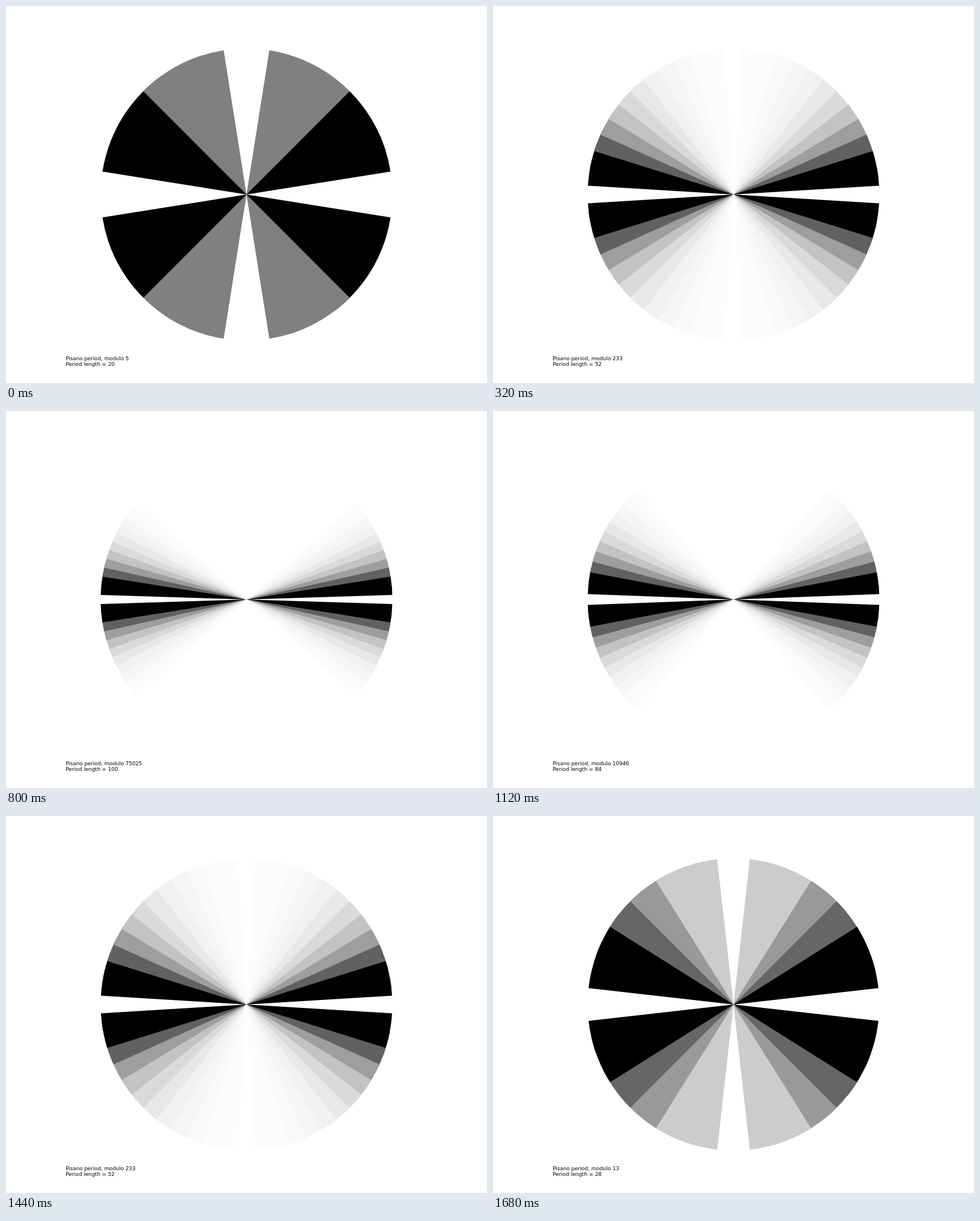
An HTML page with a canvas for the animation above (1760 ms loop, 846 by 662 pixels).

```html
<!DOCTYPE html>
<html lang="en">
<head>
<meta charset="utf-8">
<title>Pisano periods</title>
<style>
  html, body { margin: 0; width: 100%; height: 100%; overflow: hidden; background: #fff; }
  canvas { display: block; }
</style>
</head>
<body>
<canvas id="stage" width="846" height="662"></canvas>
<script>
const ctx = document.getElementById('stage').getContext('2d');
const CX = 423, CY = 331, RADIUS = 256.5;
const STEP_MS = 80, STEPS = 22;

const fib = [0, 1];
while (fib.length < 30) fib.push(fib.at(-1) + fib.at(-2));

// Distance of each Fibonacci residue from the nearest multiple of the modulus.
function residueDistances(modulus, period) {
  const distances = [];
  let a = 0, b = 1;
  for (let i = 0; i < period; i++) {
    distances.push(Math.min(a, modulus - a));
    [a, b] = [b, (a + b) % modulus];
  }
  return distances;
}

function wedge(from, to, color) {
  ctx.fillStyle = color;
  ctx.beginPath();
  ctx.moveTo(CX, CY);
  ctx.arc(CX, CY, RADIUS, from, to);
  ctx.fill();
}

function seam(angle) {
  ctx.beginPath();
  ctx.moveTo(CX, CY);
  ctx.lineTo(CX + RADIUS * Math.cos(angle), CY + RADIUS * Math.sin(angle));
  ctx.stroke();
}

function draw(step) {
  const index = 5 + 2 * Math.min(step, STEPS - step);
  const modulus = fib[index], period = 4 * index;
  const distances = residueDistances(modulus, period);
  const peak = Math.max(...distances);
  const shades = distances.map(d => {
    const darkness = 255 * d / peak;
    return darkness < 2.5 ? 255 : Math.round(255 - darkness);
  });
  const size = 2 * Math.PI / period;
  const startOf = i => -Math.PI / 2 + (i - 0.5) * size;

  ctx.fillStyle = '#fff';
  ctx.fillRect(0, 0, 846, 662);

  // Run under the next coloured wedge so that no background shows between them.
  shades.forEach((shade, i) => {
    if (shade === 255) return;
    const overlap = shades[(i + 1) % period] < 255 ? 0.5 : 0;
    wedge(startOf(i), startOf(i + 1 + overlap), `rgb(${shade},${shade},${shade})`);
  });

  ctx.strokeStyle = 'rgba(255,255,255,0.035)';
  ctx.lineWidth = 1;
  shades.forEach((shade, i) => {
    if (i && shade < 255 && shade === shades[i - 1]) seam(startOf(i));
  });

  ctx.fillStyle = '#000';
  ctx.font = '9.2px "DejaVu Sans", sans-serif';
  ctx.fillText(`Pisano period, modulo ${modulus}`, 105.1, 622);
  ctx.fillText(`Period length = ${period}`, 105.1, 631.6);
}

let shown = -1;
function tick(now) {
  const step = Math.floor(Math.max(now, 0) / STEP_MS) % STEPS;
  if (step !== shown) draw(shown = step);
  requestAnimationFrame(tick);
}
draw(shown = 0);
requestAnimationFrame(tick);
</script>
</body>
</html>
```
